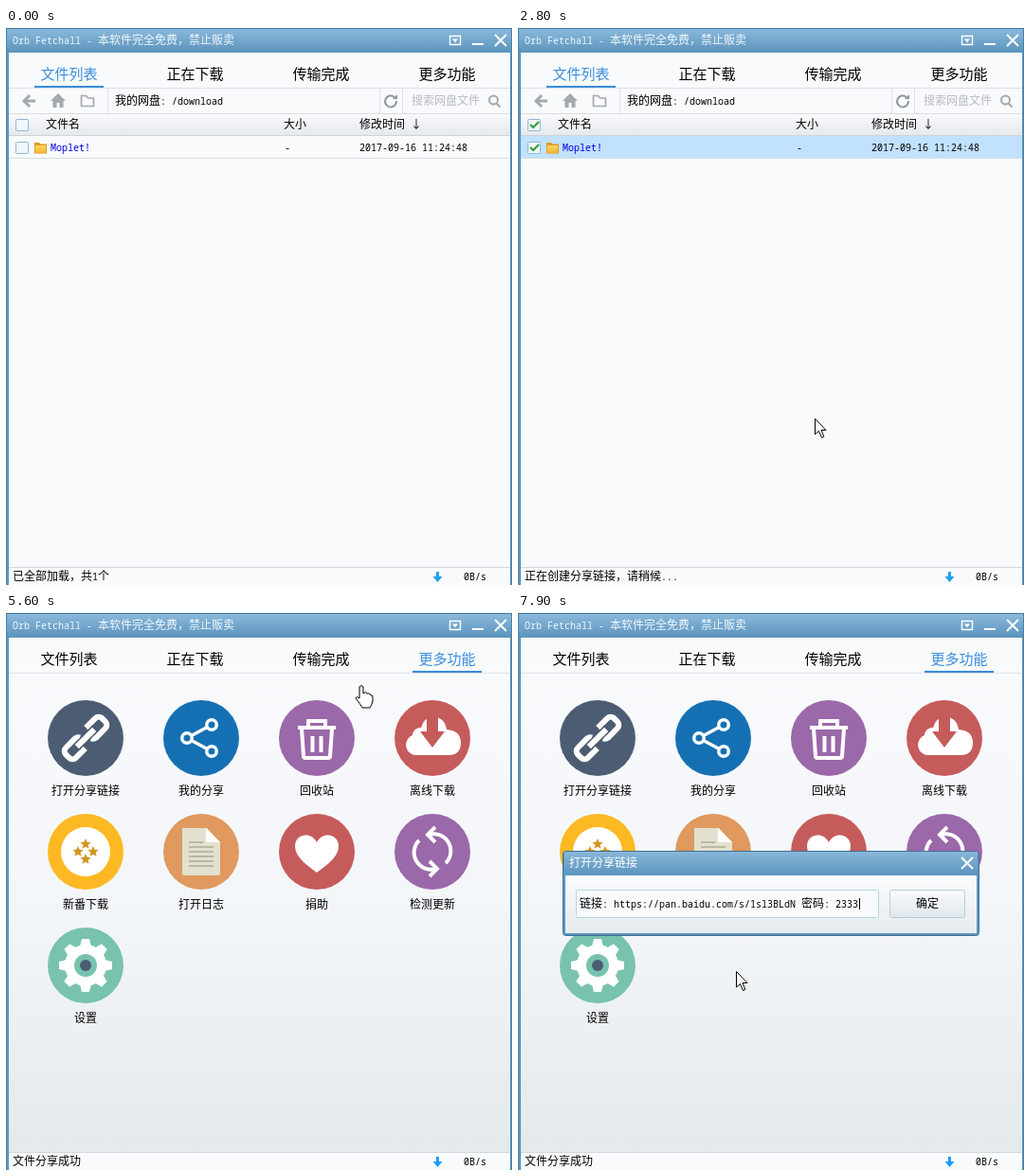
Animation, 534 px wide and 588 px high, one loop 8 s. Source, as an HTML page with a canvas:

```html
<!DOCTYPE html>
<html lang="zh">
<head>
<meta charset="utf-8">
<style>
html, body { margin: 0; width: 100%; height: 100%; overflow: hidden; }
canvas { display: block; }
</style>
</head>
<body>
<canvas width="534" height="588"></canvas>
<script>
const c = document.querySelector('canvas').getContext('2d');
const CJK = '"Noto Sans CJK SC","Noto Sans CJK",sans-serif';
const MONO = '"Noto Sans Mono",monospace';
const LOOP = 8000;
const LINK = '链接: https://pan.baidu.com/s/1sl3BLdN 密码: 2333';
const BLUE = '#3a8ddb', INK = '#000', PALE = '#f8fafc', GREY = '#a3a9af';

// Pointer path: time, x, y
const path = [
  [200, 458, 153], [300, 297, 179], [400, 160, 160], [500, 70, 133], [600, 38, 122], [700, 88, 126],
  [1100, 88, 126], [1700, 133, 187], [2000, 133, 187], [2800, 313, 412], [3500, 313, 412],
  [4000, 425, 308], [4400, 425, 308], [4800, 470, 265], [5100, 470, 265], [5300, 462, 57],
  [5500, 462, 57], [5900, 113, 132], [6200, 113, 132], [6400, 132, 276], [6800, 190, 303],
  [7100, 189, 303], [7700, 230, 378], [LOOP, 230, 378]
];
const arrow = new Path2D('M.5.5V17L4.5 13.5L7.5 20.5L9.8 19.5L7 12.5H12Z');
const hand = new Path2D('M-2 2Q0-1 2 2V9Q5 6 6 9Q9 8 10 11Q12 10 12 13V17Q11 21 9 24H1Q-1 20-6 14Q-5 11-2 14Z');

function pointerAt(t) {
  const i = path.findIndex(p => p[0] > t);
  if (i === 0) return null;
  const [t0, x0, y0] = path[i - 1], [t1, x1, y1] = path[i];
  const k = (t - t0) / (t1 - t0);
  return { x: Math.round(x0 + (x1 - x0) * k), y: Math.round(y0 + (y1 - y0) * k) };
}
const inside = (p, x, y, w, h) => p && p.x >= x && p.x < x + w && p.y >= y && p.y < y + h;

function rect(x, y, w, h, fill) {
  c.fillStyle = fill;
  c.fillRect(x, y, w, h);
}
function shade(y, h, ...colors) {
  const g = c.createLinearGradient(0, y, 0, y + h);
  colors.forEach((col, i) => g.addColorStop(i / (colors.length - 1), col));
  return g;
}
function box(x, y, w, h, fill, edge, r = 0) {
  c.beginPath();
  c.roundRect(x + .5, y + .5, w - 1, h - 1, r);
  c.fillStyle = fill;
  c.fill();
  c.strokeStyle = edge;
  c.lineWidth = 1;
  c.stroke();
}
function stroke(d, color, width = 1) {
  c.strokeStyle = color;
  c.lineWidth = width;
  c.stroke(new Path2D(d));
}
function fill(d, color) {
  c.fillStyle = color;
  c.fill(new Path2D(d));
}
function disc(x, y, r, color) {
  c.beginPath();
  c.arc(x, y, r, 0, 7);
  c.fillStyle = color;
  c.fill();
}
function at(x, y, draw) {
  c.save();
  c.translate(x, y);
  draw();
  c.restore();
}
// Wide glyphs take 12 px, Latin ones 6 px
function text(s, x, cy, color = INK) {
  c.fillStyle = color;
  for (const run of s.match(/[ -~]+|[^ -~]+/g)) {
    c.font = run > '~' ? '12px ' + CJK : '10px ' + MONO;
    c.fillText(run, x, Math.floor(cy + 4.5));
    x += c.measureText(run).width;
  }
}
const label = (s, cx, cy, color) => text(s, cx - 6 * s.length, cy, color);
const cross = (x, y) => stroke(`M${x - 6} ${y - 6}l12 12m0-12l-12 12`, '#fff', 2);

function button(x, y, w, h, s, p) {
  const hot = inside(p, x, y, w, h);
  box(x, y, w, h, shade(y, h, '#fbfcfd', hot ? '#d3e8f6' : '#dfe7ec'), hot ? '#6fb0dc' : '#b3cddd', 2);
  label(s, x + w / 2, y + h / 2);
}
function dialog(x, y, w, h, title, p) {
  box(x, y, w, h, '#5f97bf', '#3c6f95', 3);
  rect(x + 2, y + 1, w - 4, 25, shade(y, 26, '#8ab8da', '#5b94bc'));
  rect(x + 3, y + 26, w - 6, h - 29, shade(y + 26, h - 29, '#fafcfd', '#e6ebef'));
  text(title, x + 7, y + 13, '#fff');
  if (inside(p, x + 416, y + 2, 22, 23)) box(x + 416, y + 2, 22, 23, shade(y, 25, '#f0606a', '#cf2430'), '#a92a36', 2);
  cross(x + w - 13, y + 13);
}
function linkDialog(title, value, action, p) {
  dialog(47, 251, 440, 90, title, p);
  box(61, 292, 320, 30, '#f8fafc', '#b5d5ea', 1);
  text(value, 65, 307);
  button(392, 292, 80, 30, action, p);
}

function checkbox(y, on) {
  box(10, y, 14, 13, '#f0f6fb', '#8db6d9', 1);
  if (on) stroke(`M13 ${y + 6}l3 3l6-6`, '#33a03c', 2.2);
}

function frameAndTabs(active, hot) {
  rect(0, 0, 534, 588, '#5f97bf');
  rect(0, 0, 534, 26, shade(0, 26, '#8cbadd', '#5b93bc'));
  rect(0, 0, 534, 1, '#3f749c');
  rect(0, 0, 1, 588, '#487ea5');
  rect(533, 0, 1, 588, '#487ea5');
  rect(3, 26, 529, 562, PALE);
  text('Orb Fetchall - 本软件完全免费，禁止贩卖', 7, 13, '#f1f7fb');
  stroke('M468.5 8.5h11v9h-11z', '#fff', 1.4);
  fill('M471 11.5h6l-3 4z', '#fff');
  rect(492, 16, 12, 2, '#fff');
  cross(522, 13);
  ['文件列表', '正在下载', '传输完成', '更多功能'].forEach((s, i) => {
    const cx = 66.5 + 133 * i;
    c.font = '15px ' + CJK;
    c.fillStyle = i === active || i === hot ? BLUE : INK;
    c.fillText(s, cx - 30, 54);
    if (i === active) rect(Math.round(cx - 37), 61, 73, 2, BLUE);
  });
  rect(3, 63, 529, 1, '#dde1e5');
}

function fileList(selected) {
  stroke('M31 77H19m6-6l-6 6l6 6', GREY, 3);
  fill('M55 69l8 8h-2.500v7h-4v-5h-3v5h-4v-7h-2.500z', GREY);
  stroke('M79.500 82.500v-11h5l2 2.500h6v8.500z', GREY, 1.6);
  for (const x of [107, 394, 418]) rect(x, 64, 1, 26, '#e1e4e8');
  text('我的网盘: /download', 115, 77);
  stroke('M410 73a6 6 0 1 0 2 4', '#8f959a', 2);
  fill('M413 70v5h-5z', '#8f959a');
  text('搜索网盘文件', 428, 77, '#b6bbc1');
  stroke('M519 76a4.500 4.500 0 1 0-9 0a4.500 4.500 0 1 0 9 0m-1.500 3.500l4 4', GREY, 2);
  rect(3, 90, 529, 24, shade(90, 24, '#fbfbfc', '#e5e7eb'));
  rect(3, 90, 529, 1, '#d9dde1');
  rect(3, 113, 529, 1, '#cfd4d9');
  text('文件名', 42, 102);
  text('大小', 293, 102);
  text('修改时间 ↓', 373, 102);
  if (selected) rect(3, 114, 529, 23, '#c1e1ff');
  rect(3, 137, 529, 1, '#d8dde1');
  checkbox(96, selected);
  checkbox(120, selected);
  fill('M30 121h5l1.500 1.500h6.500v10h-13z', '#e29a22');
  rect(31, 124, 11, 8, shade(124, 8, '#ffd766', '#f5b030'));
  text('Moplet!', 47, 126, '#0000e0');
  text('-', 294, 126);
  text('2017-09-16 11:24:48', 373, 126);
}

function star(x, y, r) {
  let d = '';
  for (let i = 0; i < 10; i++) {
    const a = i * Math.PI / 5, q = i % 2 ? r * .45 : r;
    d += `${i ? 'L' : 'M'}${x + q * Math.sin(a)} ${y - q * Math.cos(a)}`;
  }
  fill(d + 'Z', '#d0951f');
}

const tiles = [
  ['打开分享链接', '#4c5c72', col => {
    c.rotate(-Math.PI / 4);
    stroke('M-8 7.500h-14a5 5 0 0 1-5-5v-5a5 5 0 0 1 5-5h14a5 5 0 0 1 4 3M8-7.500h14a5 5 0 0 1 5 5v5a5 5 0 0 1-5 5h-14a5 5 0 0 1-4-3', '#fff', 6);
    stroke('M-15 0h30', col, 9);
    stroke('M-13 0h26', '#fff', 6);
  }],
  ['我的分享', '#1570b3', col => {
    stroke('M11-14L-15 0L11 14', '#fff', 3.5);
    for (const [x, y] of [[-15, 0], [11, -14], [11, 14]]) {
      disc(x, y, 7, '#fff');
      disc(x, y, 3.5, col);
    }
  }],
  ['回收站', '#9b68a9', () => {
    stroke('M-20-11H20M-9-12v-6h18v6M-16-10l2 29q0 2 2 2h24q2 0 2-2l2-29', '#fff', 4);
    stroke('M-4.500-2v17M4.500-2v17', '#fff', 4);
  }],
  ['离线下载', '#c65b5b', col => {
    fill('M-19 18a11 11 0 0 1-2-21q1-8 9-8q3-11 13-11q12 0 14 13q15 1 15 14q0 13-13 13z', '#fff');
    fill('M-6-23h12v16h7l-13 17l-13-17h7z', col);
  }],
  ['新番下载', '#fdb924', () => {
    disc(0, 0, 26, '#fff');
    star(0, -8, 6);
    star(-8, 0, 6);
    star(8, 0, 6);
    star(0, 8, 6);
  }],
  ['打开日志', '#e0995f', () => {
    fill('M-20-25h26l14 15v33q0 2-2 2h-36q-2 0-2-2z', '#e3e0cf');
    fill('M5-25l15 15h-15z', '#fff');
    for (let i = 0; i < 6; i++) rect(-13, -11 + i * 5, i < 1 ? 15 : 26, 2, '#bab7a3');
  }],
  ['捐助', '#c65b5b', () => fill('M0 22C-14 12-23 4-23-6C-23-19-6-22 0-10C6-22 23-19 23-6C23 4 14 12 0 22Z', '#fff')],
  ['检测更新', '#9b68a9', () => {
    for (let i = 0; i < 2; i++) {
      stroke('M14 12A18 18 0 0 0-4-18M3-26l-8 8l8 8', '#fff', 4);
      c.rotate(Math.PI);
    }
  }],
  ['设置', '#78c2ae', col => {
    for (let i = 0; i < 8; i++) {
      fill('M-6-20l2-8h8l2 8z', '#fff');
      c.rotate(Math.PI / 4);
    }
    disc(0, 0, 22, '#fff');
    disc(0, 0, 12, col);
    disc(0, 0, 6, '#4c5c72');
  }]
];

function morePage(p) {
  rect(3, 64, 529, 505, shade(64, 505, PALE, '#f3f6f8', '#e4e9ec'));
  tiles.forEach(([name, color, draw], i) => {
    const x = 84 + i % 4 * 122, y = 132 + Math.floor(i / 4) * 120;
    if (inside(p, x - 61, y - 48, 122, 120)) {
      box(x - 61, y - 48, 122, 120, shade(y - 48, 120, '#edf3f6', '#c9dde8'), '#9fc0d3', 2);
    }
    disc(x, y, 40, color);
    at(x, y, () => draw(color));
    label(name, x, y + 56);
  });
}

function statusBar(message) {
  rect(3, 569, 529, 19, PALE);
  rect(3, 569, 529, 1, '#d3d8dc');
  text(message, 7, 579);
  fill('M454 574h3v5h3.500l-5 6l-5-6h3.500z', '#1f9ff0');
  text('0B/s', 483, 579);
}

function fileMenu(p) {
  box(88, 126, 98, 183, PALE, '#333');
  rect(90, 128, 24, 179, '#e6eef1');
  for (const y of [178, 206, 258]) rect(119, y, 63, 1, '#b5babd');
  const items = { 下载: 140, 提取链接: 163, 分享: 192, 复制到: 221, 移动到: 244, 重命名: 273, 删除: 296 };
  for (const [s, y] of Object.entries(items)) {
    const hot = inside(p, 90, y - 12, 94, 23);
    if (hot) rect(90, y - 12, 94, 23, '#318acb');
    if (s === '分享') at(102, y - 1, () => {
      const col = hot ? '#a9d6f5' : '#7f97a5';
      stroke('M4-4L-4 0L4 4', col);
      for (const [x, dy] of [[-4, 0], [4, -4], [4, 4]]) disc(x, dy, 1.6, col);
    });
    text(s, 120, y);
  }
}

function shareOptions(p) {
  dialog(67, 156, 400, 280, '分享', p);
  label('密码:', 236, 271);
  box(258, 261, 56, 20, '#fafcfd', '#b5d5ea', 1);
  text('2333', 262, 271);
  button(277, 398, 76, 28, '确定', p);
  button(375, 398, 76, 28, '取消', p);
}

function editMenu(p, alpha) {
  c.globalAlpha = alpha;
  rect(423, 308, 2, 274, '#a8abad');
  rect(195, 580, 228, 2, '#a8abad');
  box(189, 303, 234, 277, '#f0f1f1', '#b5b5b5');
  for (const y of [331, 426, 455, 528]) rect(220, y, 199, 1, '#d2d2d2');
  const items = {
    '撤消(U)': 317, '剪切(T)': 346, '复制(C)': 368, '粘贴(P)': 390, '删除(D)': 412, '全选(A)': 441,
    '从右到左的阅读顺序(R)': 470, '显示 Unicode 控制字符(S)': 492, '插入 Unicode 控制字符(I)': 514,
    '关闭输入法(L)': 543, '汉字重选(R)': 565
  };
  for (const [s, y] of Object.entries(items)) {
    const enabled = /[PSIL]\)|阅读/.test(s);
    if (enabled && inside(p, 192, y - 12, 228, 22)) rect(192, y - 11, 228, 22, '#91c9f7');
    c.font = '12px "Noto Sans",' + CJK;
    c.fillStyle = enabled ? INK : '#858585';
    c.fillText(s, 224, y + 4);
  }
  stroke('M406 510.500l3.500 3.500l-3.500 3.500', '#333');
  c.globalAlpha = 1;
}

function pointer(p, t) {
  if (!p) return;
  at(p.x, p.y, () => {
    if (t >= 6500 && t < 7100) {
      return stroke('M-3-8.500h2.500l.5.5l.5-.5h2.500M0-8v16M-3 8.500h2.500l.5-.5l.5.5h2.500', INK);
    }
    const shape = t >= 5400 && t < 6300 ? hand : arrow;
    c.fillStyle = '#fff';
    c.fill(shape);
    c.strokeStyle = INK;
    c.lineWidth = 1;
    c.stroke(shape);
  });
}

function draw(t) {
  const p = pointerAt(t), more = t >= 5600;
  const during = (from, to) => t >= from && t < to;
  frameAndTabs(more ? 3 : 0, t >= 5400 ? 3 : -1);
  if (more) morePage(t < 6300 && p);
  else fileList(t >= 900);
  statusBar(t < 2800 ? '已全部加载，共1个' : t < 3300 ? '正在创建分享链接，请稍候...' : '文件分享成功');
  if (during(1000, 1800)) fileMenu(p);
  if (during(1800, 2800)) shareOptions(p);
  if (during(3300, 5100)) linkDialog('我的分享链接' + (t >= 4300 ? ' - 已复制到剪贴板' : ''), LINK, '复制', p);
  if (t >= 6300) {
    const pasted = t >= 7900;
    linkDialog('打开分享链接', pasted ? LINK : ' ', '确定', p);
    if (pasted) rect(360, 301, 1, 12, INK);
    else if (during(6500, 7100)) rect(65, 301, 1, 12, INK);
  }
  if (during(7100, 7900)) editMenu(p, t < 7200 ? .75 : 1);
  pointer(p, t);
}

function tick() {
  draw(Math.floor(performance.now() % LOOP / 100) * 100);
  requestAnimationFrame(tick);
}
tick();
</script>
</body>
</html>
```
